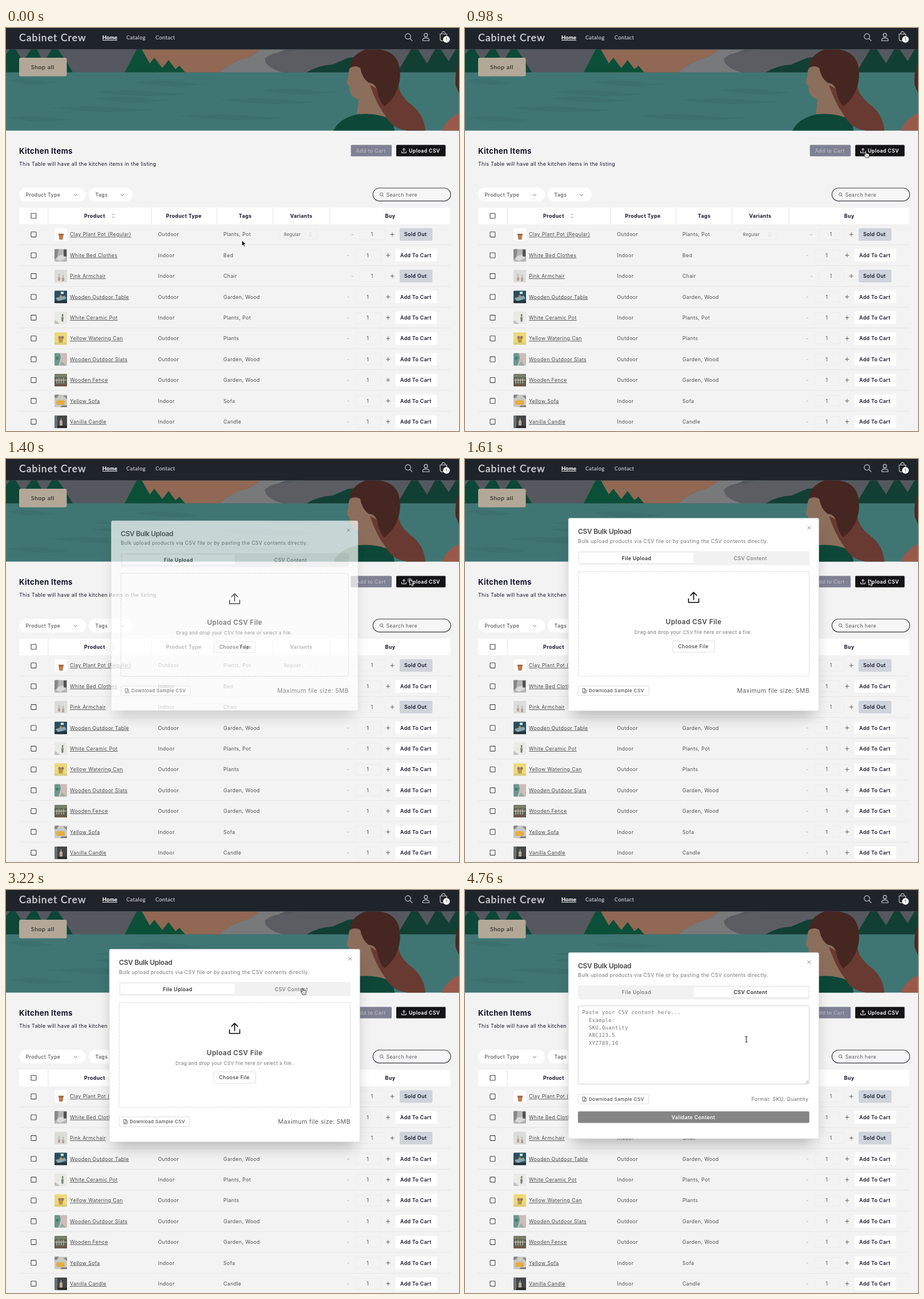
Recreate the animation shown at these times as an HTML page. Size 794 px wide and 705 px high, loop 4830 ms.

```html
<!DOCTYPE html>
<html lang="en">
<head>
<meta charset="utf-8">
<title>Kitchen items</title>
<style>
html, body { margin: 0; height: 100%; overflow: hidden; background: #f3f3f3; }
svg { display: block; width: 100vw; height: 100vh; font: 8.8px Inter, sans-serif; letter-spacing: .38px; }
text { white-space: pre; }
.brand { font-family: Lato, sans-serif; }
.mono { font: 8.9px "DejaVu Sans Mono", monospace; letter-spacing: .41px; }
.link { text-decoration: underline; text-decoration-thickness: .7px; text-underline-offset: 1.5px; }
</style>
</head>
<body>
<svg id="stage" viewBox="0 0 794 705" xmlns="http://www.w3.org/2000/svg"></svg>
<script>
const LOOP = 4830, STEP = 70;
const INK = '#14142b', GREY = '#505050';

const rect = (x, y, w, h, fill, extra = '') =>
  `<rect x="${x}" y="${y}" width="${w}" height="${h}" fill="${fill}" ${extra}/>`;
const path = (d, fill, extra = '') => `<path d="${d}" fill="${fill}" ${extra}/>`;
const line = (d, color, width = 1, extra = '') =>
  path(d, 'none', `stroke="${color}" stroke-width="${width}" ${extra}`);
const dot = (x, y, r, fill, extra = '') => `<circle cx="${x}" cy="${y}" r="${r}" fill="${fill}" ${extra}/>`;
// y is the middle of the capital letters
const text = (x, y, str, fill = GREY, size = 8.8, weight = 400, extra = '') =>
  `<text x="${x}" y="${y + size * .364}" fill="${fill}" font-size="${size}" font-weight="${weight}" ${extra}>${str}</text>`;
const at = (x, y, body) => `<g transform="translate(${x} ${y})">${body}</g>`;

function uploadIcon(x, y, s, color, width) {
  return at(x, y, line(`M0 ${.2 * s}V${-.45 * s}M${-.27 * s} ${-.18 * s}L0 ${-.45 * s} ${.27 * s} ${-.18 * s}` +
    `M${-.46 * s} ${.14 * s}V${.45 * s}H${.46 * s}V${.14 * s}`, color, width, 'stroke-linejoin="round" stroke-linecap="round"'));
}

// A thin outline gives the light face a medium weight
const brandText = (x, y, str, fill, size, spacing, weight = 400) =>
  text(x, y, str, fill, size, weight, `class="brand" letter-spacing="${spacing}" stroke="${fill}" stroke-width="${size * .022}"`);

function header() {
  const icon = 'stroke-linecap="round"';
  return rect(0, 0, 794, 37.5, '#1f242b') +
    brandText(23, 16.2, 'Cabinet Crew', '#cfd1d3', 17.5, 1.1) +
    brandText(169, 16.2, 'Home', '#fff', 9.2, .38, 700) +
    line('M169 21.5H195', '#e8e8e8', 1) +
    brandText(211, 16.2, 'Catalog', '#c3c5c8', 9.2, .45) +
    brandText(262, 16.2, 'Contact', '#c3c5c8', 9.2, .38) +
    line('M708.3 18.6L712 22.3', '#cfd1d3', 1.1, icon) +
    dot(704.5, 14.7, 4.8, 'none', 'stroke="#cfd1d3" stroke-width="1.1"') +
    dot(736, 12.4, 3, 'none', 'stroke="#cfd1d3" stroke-width="1.1"') +
    line('M730.4 22.3V20.5Q731 17.4 736 17.4T741.6 20.5V22.3Z', '#cfd1d3', 1.1) +
    line('M761 10.5H772.5V19Q772.5 22.5 769 22.5H764.5Q761 22.5 761 19ZM763.6 10.5Q763.6 6.3 766.8 6.3T770 10.5', '#cfd1d3', 1.1) +
    dot(772, 19.8, 5.9, '#fff') + text(770.4, 19.8, '1', '#1f242b', 6.2, 500, 'letter-spacing="0"');
}

function banner() {
  let waves = '';
  for (let i = 0; i < 9; i++) {
    const x = (i * 149) % 520, y = 92 + (i * 31) % 76, w = 60 + (i * 37) % 80;
    waves += path(`M${x} ${y}q${w / 2} -7 ${w} 0q${w / 4} 4 ${w / 2} 2q${-w / 2} 8 ${-w} 4z`, '#3b706f');
  }
  return rect(0, 37.5, 794, 142, '#3f7674') + waves +
    rect(0, 37.5, 794, 40, '#55585e') +
    path('M0 77.5V46L7 37.5H17L30 58 44 37.5H54L66 60 80 37.5H91L104 56 117 77.5Z', '#0d4737') +
    path('M232 37.5H445Q430 52 412 55 392 62 374 77.5H262Z', '#906853') +
    path('M445 37.5H490L455 52Q458 72 486 77.5H374Q392 62 412 55 430 52 445 37.5Z', '#78797b') +
    path('M486 77.5Q452 68 454 53 468 40 492 43 510 37 528 37.5H640V77.5Z', '#5b5d62') +
    path('M527 77.5Q548 65 572 64L600 52 650 48V77.5Z', '#123f34') +
    path('M208 77.5L229 37.5H238L252 62 260 52 274 70 285 56 297 72 304 66 314 77.5Z', '#0b4f39') +
    path('M686 77.5L710 37.5H722L738 62 752 37.5H762L776 58 788 37.5H794V77.5Z', '#123f34') +
    path('M608 60Q599 74 600 84L597 96 602 102Q601 120 618 125L615 152 668 160 668 96 640 60Z', '#8c6e5d') +
    path('M574 179.5Q584 158 616 151 646 148 668 157 680 164 681 179.5Z', '#0d4737') +
    path('M638 100Q655 106 662 124 672 114 688 101 690 118 710 134 733 151 735 179.5H703Q676 176 664 152 650 134 638 100Z', '#693a31') +
    path('M603 70Q603 48 630 37.5H655Q684 42 689 66 693 84 688 101 681 124 663 137 654 128 651 110 647 96 636 96 624 88 621 70 612 64 603 70Z', '#462620') +
    path('M794 62Q786 78 788 100L794 114Z', '#4a2a24') +
    path('M764 179.5Q772 159 794 149V179.5Z', '#99594a') +
    rect(23, 52, 83.5, 32.5, '#b3a898', 'rx="3"') +
    brandText(44, 68.5, 'Shop all', '#34322e', 10.4, .62);
}

function toolbar() {
  const chevron = (x) => line(`M${x - 3} 290.6l3 2.9 3-2.9`, '#555', .9);
  return text(23, 215, 'Kitchen Items', INK, 13.2, 700) +
    text(23, 237.3, 'This Table will have all the kitchen items in the listing', INK) +
    rect(604.5, 204.5, 71.5, 20, '#7f8194', 'rx="1.5"') +
    text(613.5, 214.7, 'Add to Cart', '#b3b4c0', 8.7, 600) +
    rect(684, 204.5, 86.5, 20, '#141416', 'rx="1.5"') +
    uploadIcon(697.5, 214.6, 8.4, '#fff', 1) +
    text(706, 214.7, 'Upload CSV', '#fff', 8.8, 600) +
    rect(23, 279.5, 117, 24, '#fff', 'rx="12"') + text(34.5, 291.7, 'Product Type', '#5a5a5a', 8.8, 500) + chevron(122) +
    rect(145, 279.5, 77, 24, '#fff', 'rx="12"') + text(156.5, 291.7, 'Tags', '#5a5a5a', 8.8, 500) + chevron(204) +
    rect(643.2, 280, 136.2, 22.6, '#f6f6f6', 'rx="11.3" stroke="#3c3d45" stroke-width="1.2"') +
    dot(658, 291, 2.7, 'none', 'stroke="#555" stroke-width=".8"') + line('M660 293L662 295', '#555', .8) +
    text(666.5, 291.7, 'Search here', '#5c5c5c');
}

const thumbs = [
  rect(0, 0, 22, 22, '#fdfdfc') + path('M7.5 11H15.5L14.6 20H8.4Z', '#c27a4e') + rect(7, 9.6, 9, 3, '#a5694a'),
  rect(0, 0, 22, 22, '#b4b4b4') + path('M0 0H7L5 14 0 18Z', '#888') + path('M7 12L16 10 20 16 10 21 3 18Z', '#dadada') + rect(16, 1, 5, 12, '#505050'),
  rect(0, 0, 22, 22, '#dddcd9') + path('M6 13H10V19H6ZM13 14H17V20H13Z', '#b3a39a') + line('M8 13V7M15 14V9', '#8d8781', .9),
  rect(0, 0, 22, 22, '#29505f') + path('M2 13L18 9 21 14 6 19Z', '#8ba4ae') + dot(11, 10, 2, '#c9914f') + rect(11, 2, 5, 4, '#d9e2e3') + path('M0 18H22V22H0Z', '#233038'),
  rect(0, 0, 22, 22, '#e9e9e6') + path('M12 10H16L15.4 18H12.6Z', '#7d8278') + path('M14 10Q11 6 14.5 4 17 7 14 10Z', '#6f8a60') + path('M0 15L8 20V22H0Z', '#c3c2bd'),
  rect(0, 0, 22, 22, '#ecd97a') + path('M7 11H15L14 19H8Z', '#b79a45') + dot(9, 9, 2.5, '#a4727a') + dot(14, 9, 2.5, '#927b55') + rect(0, 18, 22, 4, '#dccd7c'),
  rect(0, 0, 22, 22, '#cdbcb8') + path('M0 0H9L11 8 7 22H0Z', '#6a9890') + path('M9 22L13 15 20 22Z', '#93ada3') + dot(5, 9, 2.6, '#417a72'),
  rect(0, 0, 22, 22, '#5f6251') + rect(0, 0, 22, 6, '#77806a') + line('M4 8V17M8 7V17M12 8V17M16 7V17M1 11H21', '#c8c4b5', 1.2) + rect(0, 18, 22, 4, '#6a5a48'),
  rect(0, 0, 22, 22, '#cac9c4') + rect(3, 10, 15, 8, '#e3ad42', 'rx="2"') + path('M0 0H8L4 6H0ZM15 2H22V8Z', '#868888') + path('M13 19H22V22H10Z', '#7d7b76'),
  rect(0, 0, 22, 22, '#444647') + rect(9, 9, 5, 9, '#b8ac98') + path('M0 0H5V22H0Z', '#697073') + line('M11.5 9V5', '#ddd4bd', 1) + rect(5, 18, 17, 4, '#292a2b')
];

const products = [
  ['Clay Plant Pot (Regular)', 'Outdoor', 'Plants, Pot', true],
  ['White Bed Clothes', 'Indoor', 'Bed'],
  ['Pink Armchair', 'Indoor', 'Chair', true],
  ['Wooden Outdoor Table', 'Outdoor', 'Garden, Wood'],
  ['White Ceramic Pot', 'Indoor', 'Plants, Pot'],
  ['Yellow Watering Can', 'Outdoor', 'Plants'],
  ['Wooden Outdoor Slats', 'Outdoor', 'Garden, Wood'],
  ['Wooden Fence', 'Outdoor', 'Garden, Wood'],
  ['Yellow Sofa', 'Indoor', 'Sofa'],
  ['Vanilla Candle', 'Indoor', 'Candle']
];

const checkbox = (y) => rect(44, y - 4.4, 8.8, 8.8, '#fafafa', 'rx=".8" stroke="#444" stroke-width="1.1"');
const sorter = (x, y, color) => line(`M${x - 1.8} ${y - 1.4}l1.8-1.8 1.8 1.8M${x - 1.8} ${y + 1.4}l1.8 1.8 1.8-1.8`, color, .8);

function productRow([name, type, tags, soldOut], i) {
  const y = 361.2 + i * 36.39, shift = soldOut ? 7.4 : 0;
  const button = soldOut
    ? rect(690, y - 11, 57.5, 22, '#cfd3db', 'rx="2"') + text(698, y, 'Sold Out', INK, 8.8, 600)
    : rect(682.5, y - 11, 73, 22, '#fff', 'rx="2"') + text(691, y, 'Add To Cart', INK, 8.8, 600);
  return checkbox(y) + at(85, y - 11, `<g clip-path="url(#thumb)">${thumbs[i]}</g>`) +
    text(112, y, name, '#4a4a4a', 8.8, 400, 'class="link"') + text(266.5, y, type) + text(381, y, tags) +
    rect(612.5 + shift, y - 9.5, 45, 19, 'none', 'rx="2" stroke="#ebebeb" stroke-width=".8"') +
    line(`M${598 + shift} ${y + .4}h3.6`, '#b0b0b0', .9) +
    text(632 + shift, y, '1') +
    line(`M${666.2 + shift} ${y}h7M${669.7 + shift} ${y - 3.5}v7`, '#555', .9) + button +
    line(`M23 ${y + 18.1}H779`, '#e5e5e5', .9);
}

function table() {
  const heads = [[137, 'Product'], [280.5, 'Product Type'], [408, 'Tags'], [498, 'Variants'], [664.5, 'Buy']];
  return rect(23, 314.3, 756, 29, '#fff') +
    line('M74 314.3V343.3M255 314.3V343.3M369.6 314.3V343.3M468 314.3V343.3M567.7 314.3V343.3', '#e9e9ea', 1.3) +
    checkbox(328.6) + heads.map(([x, s]) => text(x, 328.8, s, INK, 8.9, 700)).join('') + sorter(188, 328.6, '#666') +
    products.map(productRow).join('') +
    rect(480, 352, 65, 18, 'none', 'rx="2" stroke="#ebebeb" stroke-width=".8"') +
    text(487, 361.2, 'Regular', '#555', 7.5) + sorter(533.5, 361.2, '#c2c2c2');
}

// Shared frame of the dialog; tab 0 is the file drop, tab 1 the pasted text
function dialog(top, height, tab, body) {
  const tabX = tab ? 401 : 200.3;
  return rect(189, top + 24, 423, height - 16, '#000', 'rx="4" opacity=".27" filter="url(#blur)"') +
    rect(181.2, top, 439, height, '#fff', 'rx="2.5" stroke="#dcdcdc" stroke-width=".6"') +
    text(198, top + 23.2, 'CSV Bulk Upload', '#4a4a4a', 12, 600, 'letter-spacing="-.3"') +
    line(`M600.2 ${top + 13.7}l6 6m0-6l-6 6`, '#777', .9) +
    text(198, top + 39.8, 'Bulk upload products via CSV file or by pasting the CSV contents directly.', '#737373') +
    rect(198, top + 57.5, 406, 24.5, '#f1f1f1', 'rx="3"') +
    rect(tabX, top + 61, 200.8, 18, '#dedede', 'rx="2"') +
    rect(tabX, top + 60.5, 200.8, 17.8, '#fff', 'rx="2"') +
    text(275, top + 69.8, 'File Upload', tab ? '#777' : '#333', 8.8, tab ? 500 : 600) +
    text(471, top + 69.8, 'CSV Content', tab ? '#333' : '#777', 8.8, tab ? 600 : 500) + body;
}

function sampleButton(y) {
  return rect(198.2, y - 8.3, 124, 16.6, '#fff', 'rx="2" stroke="#dadada" stroke-width=".9"') +
    line(`M206.2 ${y - 3.8}h3.6l2.5 2.4v5.4h-6.1zM209.6 ${y - 3.6}v2.4h2.5M209.2 ${y - .3}v3m-1.3-1.3l1.3 1.3 1.3-1.3`, '#444', .8) +
    text(217, y, 'Download Sample CSV', '#505050', 8.2, 500);
}

function filePanel() {
  return dialog(103.6, 337, 0,
    rect(198.5, 197, 404.8, 183, 'none', 'rx="2" stroke="#d2d2d2" stroke-width="1.2" stroke-dasharray="2.4 1.6"') +
    uploadIcon(400.7, 242, 19.5, '#222', 1.8) +
    text(351.8, 284.2, 'Upload CSV File', '#4a4a4a', 11.9, 600) +
    text(297, 302.6, 'Drag and drop your CSV file here or select a file.', '#707070', 8.2) +
    rect(364.2, 318, 73.5, 20, '#fff', 'rx="2.5" stroke="#dedede"') +
    text(373.5, 328, 'Choose File', '#444', 8.8, 500) +
    sampleButton(405.2) + text(476.7, 405.4, 'Maximum file size: 5MB', '#5e5e5e', 10.6));
}

function textPanel() {
  const lines = ['Paste your CSV content here...', '  Example:', '  SKU,Quantity', '  ABC123,5', '  XYZ789,10'];
  return dialog(109.4, 325.5, 1,
    rect(198.3, 202.7, 405, 136.8, '#fff', 'rx="2" stroke="#cfcfcf"') +
    lines.map((s, i) => `<text x="205.5" y="${217.1 + i * 13.4}" fill="#757575" class="mono" xml:space="preserve">${s}</text>`).join('') +
    line('M597 338l5-5M600 338l2-2', '#777', .8) +
    sampleButton(365.8) + text(502, 365.9, 'Format: SKU, Quantity', '#6a6a6a') +
    rect(198, 387.2, 405.5, 20.4, '#858585', 'rx="2"') +
    text(362, 397.5, 'Validate Content', '#fff', 8.8, 600));
}

const pointers = {
  arrow: path('M0 0V10.2L2.4 8 4 11.6 5.8 10.8 4.2 7.3H7.4Z', '#111', 'stroke="#fff" stroke-width=".9" stroke-linejoin="round"'),
  hand: path('M-1 1Q0-.6 1 1V4.6L2 4.3 3.2 4.7 4.2 4.8 5.4 5.2Q6.3 5.6 6.2 6.6L5.6 9.4V11.6H0L-1.1 9.4-3 7.2Q-3.2 5.9-1.9 6.2L-1 7Z',
    '#fff', 'stroke="#222" stroke-width=".9" stroke-linejoin="round"') + line('M1.6 7.2V9.6M3.6 7.2V9.6', '#444', .6),
  beam: line('M-2.2-5Q0-5 0-3.8 0-5 2.2-5M0-4V4M-2.2 5Q0 5 0 3.8 0 5 2.2 5', '#222', 1.1)
};

const stage = document.getElementById('stage');
stage.innerHTML = `<defs>
  <filter id="blur" x="-20%" y="-25%" width="140%" height="150%"><feGaussianBlur stdDeviation="14"/></filter>
  <clipPath id="thumb"><rect width="22.5" height="22.5" rx="2"/></clipPath></defs>` +
  rect(0, 0, 794, 705, '#f3f3f3') + banner() + header() + toolbar() + table() +
  `<g id="file">${filePanel()}</g><g id="paste">${textPanel()}</g>` +
  dot(707.5, 212, 4, '#8a8a8a', 'id="press" opacity=".6"') +
  '<g id="pointer">' + Object.entries(pointers).map(([k, v]) => `<g id="${k}">${v}</g>`).join('') + '</g>';

const $ = (id) => document.getElementById(id);
const show = (id, on) => $(id).setAttribute('visibility', on ? 'visible' : 'hidden');
const clamp = (v) => Math.min(1, Math.max(0, v));
const smooth = (u) => u * u * (3 - 2 * u);

// time, x, y of the pointer tip
const route = [[0, 413.3, 371.3], [630, 413.3, 371.3], [980, 702.3, 215.2], [1120, 707.8, 210.6],
  [2310, 707.8, 210.6], [2800, 520, 171.4], [4760, 520, 171.4]];

function pointerAt(t) {
  if (t >= 4760) return [493, 261.3];
  const i = route.findIndex((p) => p[0] > t);
  const a = route[i - 1], b = route[i];
  const u = smooth((t - a[0]) / (b[0] - a[0]));
  return [a[1] + (b[1] - a[1]) * u, a[2] + (b[2] - a[2]) * u];
}

function shape(t) {
  if (t >= 4760) return 'beam';
  return (t >= 910 && t < 1330) || t >= 2660 ? 'hand' : 'arrow';
}

function draw(ms) {
  const t = Math.floor((ms % LOOP) / STEP) * STEP;
  const open = 1 - (1 - clamp((t - 1320) / 240)) ** 3;
  const pasting = t >= 3430;
  show('file', open > 0 && !pasting);
  show('paste', pasting);
  $('file').setAttribute('opacity', open);
  $('file').setAttribute('transform',
    `translate(400.7 ${272 + 6.5 * (1 - open)}) scale(${.95 + .05 * open}) translate(-400.7 -272)`);
  show('press', t >= 1330 && t < 1470);
  const [x, y] = pointerAt(t), kind = shape(t);
  $('pointer').setAttribute('transform', `translate(${x} ${y})`);
  Object.keys(pointers).forEach((k) => show(k, k === kind));
}

const start = performance.now();
function tick() {
  draw(performance.now() - start);
  requestAnimationFrame(tick);
}
tick();
</script>
</body>
</html>
```
